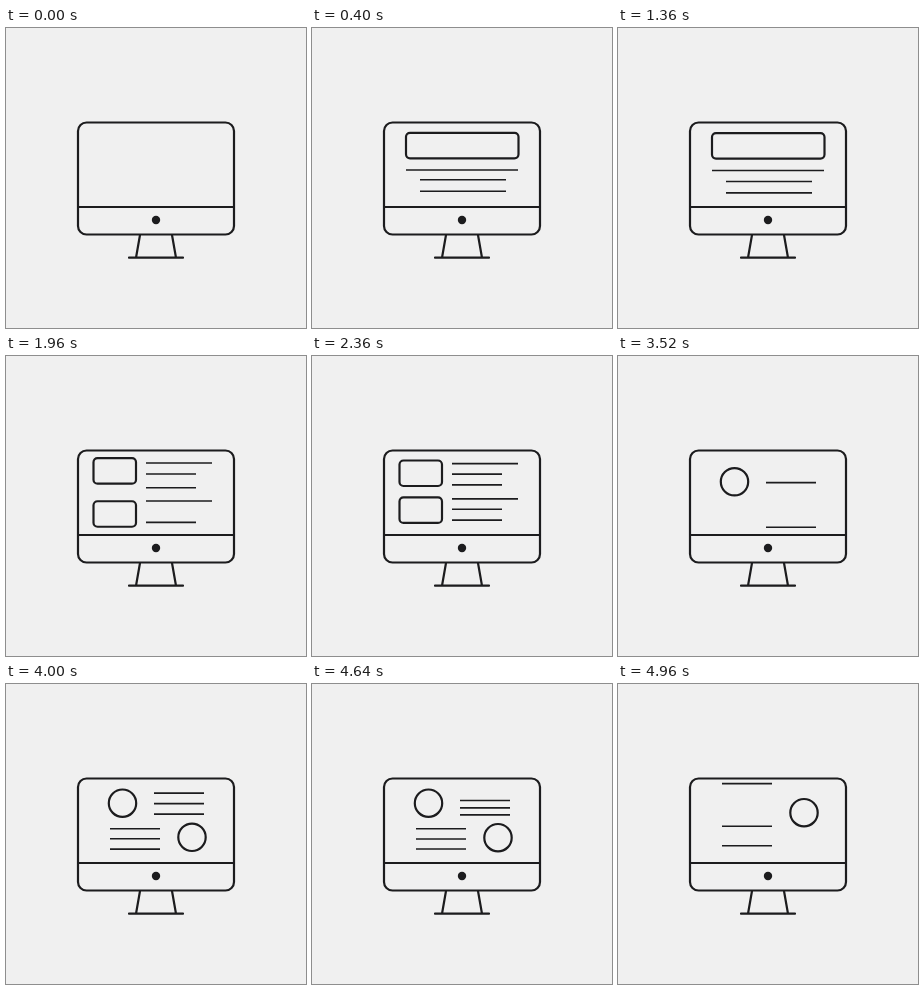
Animation of 300x300 px, one loop 5000 ms. Source, as an HTML page:

```html
<!DOCTYPE html>
<html lang="en">
<head>
<meta charset="utf-8">
<title>Screen layouts</title>
<style>
  html, body { margin: 0; width: 100%; height: 100%; overflow: hidden; background: #f0f0f0; }
  svg { display: block; width: 100%; height: 100%; }
  .ink { fill: none; stroke: #1c1c1e; stroke-width: 2.2; stroke-linecap: round; stroke-linejoin: round; }
  .thin { stroke-width: 1.6; stroke-linecap: butt; }
</style>
</head>
<body>
<svg viewBox="0 0 300 300">
  <clipPath id="screen"><rect x="73" y="94" width="154" height="84.5"/></clipPath>
  <g id="content" class="ink" clip-path="url(#screen)"></g>
  <g class="ink">
    <rect x="72" y="94.5" width="156" height="112" rx="8.5"/>
    <path d="M72 179H228M134 207L130 229.7M166 207L170 229.7M123 229.7H177"/>
    <circle cx="150" cy="192" r="4.2" fill="#1c1c1e" stroke="none"/>
  </g>
</svg>
<script>
const LOOP = 5000, STEP = 40;
const TRAVEL = 85, ENTER_MS = 600, LEAVE_MS = 240;
const content = document.getElementById('content');
const parts = [];

function add(tag, attrs, enter, leave) {
  const node = document.createElementNS('http://www.w3.org/2000/svg', tag);
  for (const key in attrs) node.setAttribute(key, attrs[key]);
  content.append(node);
  parts.push({ node, enter, leave });
}
const line = (x1, x2, y, enter, leave) => add('path', { d: `M${x1} ${y}H${x2}`, class: 'thin' }, enter, leave);
const box = (x, y, width, enter, leave) => add('rect', { x, y, width, height: 25.5, rx: 4 }, enter, leave);
const disc = (cx, cy, enter, leave) => add('circle', { cx, cy, r: 13.7 }, enter, leave);

// Banner with centred text
box(94, 105.4, 112.5, 10, 1208);
line(94, 206, 142.5, 10, 1440);
line(108, 194, 153, 45, 1345);
line(108, 194, 164, 25, 1340);

// Two cards with text on the right
box(87.5, 104.5, 42.5, 1650, 3060);
box(87.5, 141.3, 42.5, 1830, 3100);
line(140, 206, 107.5, 1807, 2883);
line(140, 190, 118, 1810, 3028);
line(140, 190, 128.7, 1826, 3012);
line(140, 206, 142.7, 1823, 3120);
line(140, 190, 153.5, 1945, 3160);
line(140, 190, 164, 1823, 3080);

// Two discs with alternating text
disc(116.5, 119.2, 3400, 4650);
disc(186, 153.7, 3600, 4768);
line(148, 198, 109, 3430, 4560);
line(148, 198, 119.7, 3560, 4590);
line(148, 198, 130, 3470, 4620);
line(104, 154, 144.7, 3520, 4803);
line(104, 154, 155, 3580, 4740);
line(104, 154, 165, 3490, 4801);

// Remaining fraction of a damped entry that overshoots slightly
const settle = p => p >= 1 ? 0 : 2 ** (-10 * p) * Math.cos(2 * Math.PI * p);
// Accelerating exit that dips first
const backIn = p => 2.70158 * p ** 3 - 1.70158 * p ** 2;

function draw(now) {
  const t = Math.floor((now % LOOP) / STEP) * STEP;
  for (const { node, enter, leave } of parts) {
    const visible = t >= enter && t < leave + LEAVE_MS;
    node.style.display = visible ? '' : 'none';
    if (!visible) continue;
    const y = t < leave
      ? TRAVEL * settle((t - enter) / ENTER_MS)
      : -TRAVEL * backIn((t - leave) / LEAVE_MS);
    node.setAttribute('transform', `translate(0 ${y.toFixed(2)})`);
  }
}

const start = performance.now();
function tick() {
  draw(performance.now() - start);
  requestAnimationFrame(tick);
}
tick();
</script>
</body>
</html>
```
